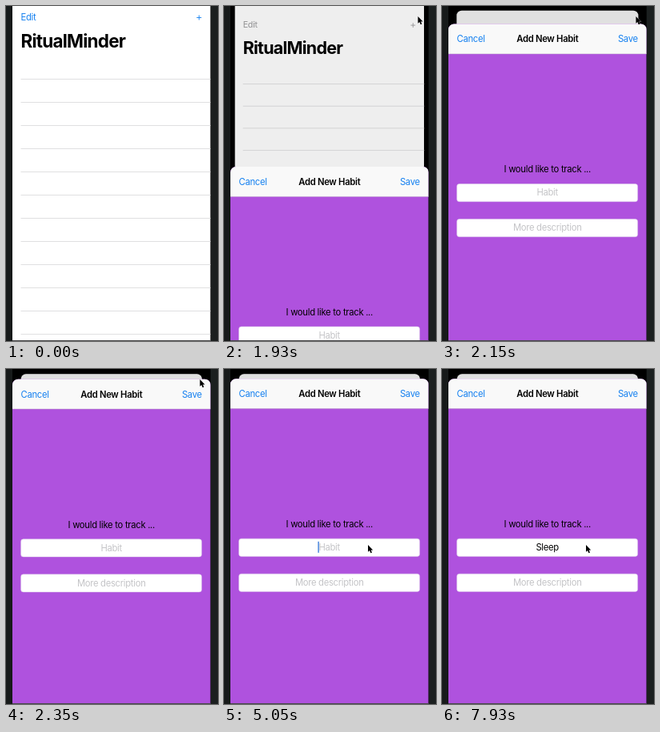
An HTML page for the animation above (8 s loop, 265x419 px).

```html
<!DOCTYPE html>
<html lang="en">
<head>
<meta charset="utf-8">
<title>Add a habit</title>
<style>
  html, body { margin: 0; width: 100%; height: 100%; overflow: hidden; background: #171a1a; }
  svg { display: block; width: 100%; height: 100%; }
  text { font: 400 11.24px Inter, Roboto, sans-serif; letter-spacing: -.025em; }
  .title { font-size: 22.5px; font-weight: 700; letter-spacing: -.035em; }
  .bold { font-weight: 600; }
  .mid { text-anchor: middle; }
  .end { text-anchor: end; }
  .link { fill: #1580f0; }
  .hint { fill: #c4c4c7; }
  .field { fill: #fff; stroke: #d9c4e6; stroke-width: .5; }
</style>
</head>
<body>
<svg viewBox="0 0 265 419">
  <defs>
    <clipPath id="screen"><rect x="8" width="247.7" height="419"/></clipPath>
  </defs>
  <rect width="265" height="419" fill="#171a1a"/>
  <rect x="255" width="10" height="419" fill="#1b1f1f"/>
  <g clip-path="url(#screen)">
    <rect x="8" width="248" height="419"/>
    <g id="list">
      <rect id="card" x="8" y="-14" width="247.7" height="460" fill="#fff"/>
      <text id="edit" x="18.5" y="18">Edit</text>
      <path id="plus" d="M238.3 14.5h6M241.3 11.5v6" fill="none" stroke-width=".9"/>
      <text class="title" x="18.5" y="52">RitualMinder</text>
      <path id="rows" stroke="#d9d9da" stroke-width=".8"/>
      <rect id="dim" x="8" y="-14" width="247.7" height="460"/>
    </g>
    <g id="sheet">
      <path d="M8 420V7a7 7 0 0 1 7-7H248.7a7 7 0 0 1 7 7V420Z" fill="#af52de"/>
      <path d="M8 37.4V7a7 7 0 0 1 7-7H248.7a7 7 0 0 1 7 7V37.4Z" fill="#f9f9f9"/>
      <path d="M8 37.4H256" stroke="#b9a5c4" stroke-width=".5"/>
      <text class="link" x="18.5" y="23">Cancel</text>
      <text class="bold mid" x="131.8" y="23">Add New Habit</text>
      <text class="link end" x="244.8" y="23">Save</text>
      <text class="mid" x="131.8" y="186">I would like to track ...</text>
      <rect class="field" x="18.6" y="200" width="226" height="22.2" rx="3.2"/>
      <rect class="field" x="18.6" y="244" width="226" height="22.2" rx="3.2"/>
      <text id="hint" class="hint mid" x="131.7" y="215">Habit</text>
      <text id="typed" class="mid" x="131.7" y="215"></text>
      <text class="hint mid" x="131.7" y="259">More description</text>
      <rect id="caret" y="203.6" width="1.3" height="14" fill="#2f74d8"/>
    </g>
    <path d="M8 418.5H256" stroke="#4a4a4c"/>
  </g>
  <path id="pointer" d="M0 0V8.8L2 7L3.4 10.2L5 9.5L3.6 6.4H6.2Z" stroke="#fff" stroke-width=".7" stroke-opacity=".8" paint-order="stroke"/>
</svg>
<script>
const LOOP = 8000, MID = 131.7;
const $ = id => document.getElementById(id);
const [list, card, edit, plus, rows, dim, sheet, hint, typed, caret, pointer] =
  ["list", "card", "edit", "plus", "rows", "dim", "sheet", "hint", "typed", "caret", "pointer"].map($);

const set = (el, attrs) => {
  for (const k in attrs) el.setAttribute(k, attrs[k]);
};
const clamp = v => Math.min(1, Math.max(0, v));
const smooth = v => v * v * (3 - 2 * v);

// Interpolates rows of [time, ...values].
function track(keys, t, ease = v => v) {
  let i = 0;
  while (i < keys.length - 2 && t >= keys[i + 1][0]) i++;
  const a = keys[i], b = keys[i + 1];
  const k = ease(clamp((t - a[0]) / (b[0] - a[0])));
  return a.slice(1).map((v, n) => v + (b[n + 1] - v) * k);
}

const pointerKeys = [
  [850, 259, 41], [1250, 242.4, 13], [2400, 242.4, 13], [2850, 130, 224],
  [3030, 130, 224], [3250, 186, 221], [3680, 186, 221], [3800, 180, 220]
];
const caretKeys = [
  [3399, 0], [3400, 1], [4050, 1], [4300, 0], [4600, 0], [4700, 1], [5050, 1],
  [5300, 0], [5600, 0], [5700, 1], [7680, 1], [7900, 0]
];
const pressKeys = [[1480, 1], [1560, .35], [1750, .35], [1850, 1]];
const keystrokes = [5930, 6550, 6600, 6800, 7100];
const word = "Sleep";

// Critically damped spring.
function present(t) {
  const x = Math.max(0, t - 1826) * .0171;
  return 1 - (1 + x) * Math.exp(-x);
}

function tint(k) {
  const from = [21, 128, 240], to = [155, 155, 157];
  return `rgb(${from.map((v, i) => Math.round(v + (to[i] - v) * k))})`;
}

rows.setAttribute("d", Array.from({ length: 12 }, (_, i) => `M18.5 ${91.5 + 29 * i}H256`).join(""));

function draw(t) {
  const p = present(t);
  set(list, { transform: `translate(${MID} ${19.1 * p}) scale(${1 - .0855 * p}) translate(${-MID} 0)` });
  set(card, { rx: 7 * p });
  set(dim, { rx: 7 * p, opacity: .126 * p });
  set(sheet, { transform: `translate(0 ${419 - 406.8 * p})` });

  const color = tint(clamp((t - 1750) / 130));
  set(edit, { fill: color });
  set(plus, { stroke: color, opacity: track(pressKeys, t)[0] });

  const text = word.slice(0, keystrokes.filter(k => t >= k).length);
  if (typed.textContent !== text) typed.textContent = text;
  set(hint, { opacity: text ? 0 : 1 });
  const edge = text ? typed.getComputedTextLength() / 2 : -hint.getComputedTextLength() / 2 - 1;
  set(caret, { x: MID + edge, opacity: track(caretKeys, t)[0] });

  const [x, y] = track(pointerKeys, t, smooth);
  set(pointer, { transform: `translate(${x} ${y})`, opacity: t < 50 ? 0 : 1 });
}

const start = performance.now();
function tick() {
  draw((performance.now() - start) % LOOP);
  requestAnimationFrame(tick);
}
tick();
</script>
</body>
</html>
```
